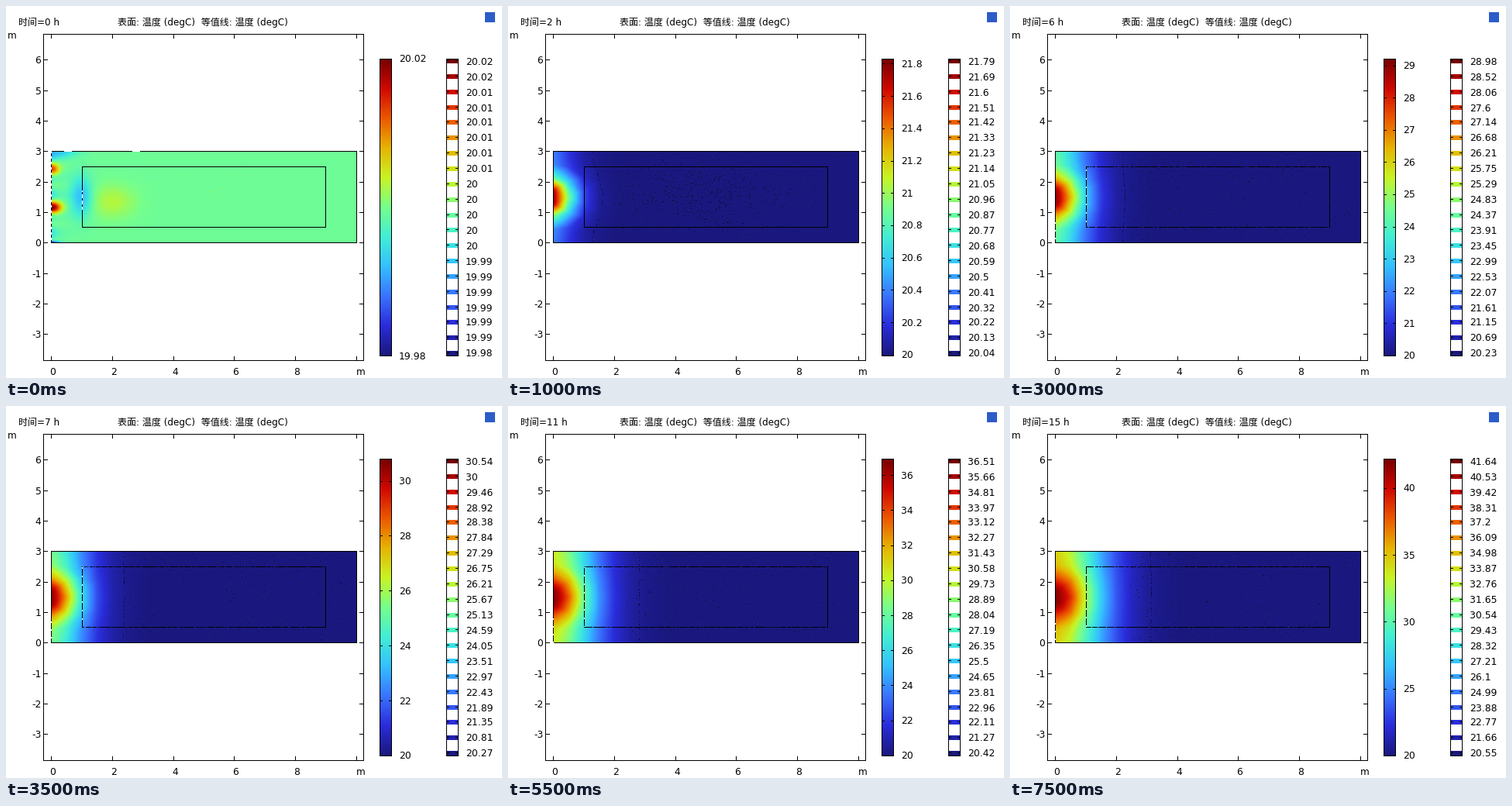
A matplotlib script that plays this animation: 640 px wide and 480 px high, repeating every 8 s.

```python
import numpy as np
import matplotlib.pyplot as plt
from matplotlib.animation import FuncAnimation
from matplotlib.colors import LinearSegmentedColormap
from matplotlib.patches import Rectangle
from matplotlib.tri import LinearTriInterpolator, Triangulation

W, H, DPI = 640, 480, 100
HOURS = 16
LEVELS = 20
X0, Y0, SCALE = 58, 305.4, 39.35       # pixel of (0 m, 0 m), pixels per metre
BAR_TOP, BAR_BOTTOM = 68, 451
BAR_SPAN = BAR_BOTTOM - BAR_TOP

plt.rcParams["font.family"] = ["DejaVu Sans", "Noto Sans CJK JP"]
rainbow = LinearSegmentedColormap.from_list("rainbow", [
    "#1a187e", "#2a2cda", "#3a74ff", "#34c0ff", "#42eed4", "#76ff8c",
    "#c8f424", "#e6b400", "#ed5800", "#d00800", "#780000"], N=512)

fig = plt.figure(figsize=(W / DPI, H / DPI), dpi=DPI, facecolor="white")
ax = fig.add_axes([0, 0, 1, 1])
ax.set_xlim(0, W)
ax.set_ylim(H, 0)
ax.autoscale(False)
ax.axis("off")


def label(x, y, s, size=12.4, ha="left"):
    return ax.text(x, y + 4.5, s, fontsize=size * 72 / DPI, ha=ha, va="baseline")


def box(x, y, w, h, color="black"):
    return ax.add_patch(Rectangle((x, y), w, h, fc=color, lw=0, antialiased=False))


def outline(x0, y0, x1, y1):
    for y in (y0, y1):
        box(x0, y, x1 - x0 + 1, 1)
    for x in (x0, x1):
        box(x, y0, 1, y1 - y0 + 1)


def image(data, x, y, w, h):
    return ax.imshow(data, extent=(x, x + w, y + h, y), aspect="auto",
                     interpolation="nearest")


def level_y(i):
    return round(448.1 - 377 * i / (LEVELS - 1))


def draw_axes():
    outline(48, 36, 461, 457)
    for m in range(0, 11, 2):
        x = round(X0 + 39.4 * m)
        box(x, 36, 1, 6)
        box(x, 452, 1, 6)
        if m < 10:
            label(x + 2, 471, str(m), ha="center")
    for m in range(-3, 7):
        y = round(Y0 - SCALE * m)
        box(48, y, 6, 1)
        box(456, y, 6, 1)
        label(45.5, y + 0.5, str(m), ha="right")
    label(458, 471, "m", 12, "center")
    label(2, 37, "m", 12)


def draw_legends():
    image(rainbow(np.linspace(1, 0, BAR_SPAN)[:, None]), 482, BAR_TOP, 16, BAR_SPAN)
    outline(482, BAR_TOP, 497, BAR_BOTTOM)
    for i in range(LEVELS):
        y = level_y(i)
        box(569, y - 3, 14, 6, rainbow(i / (LEVELS - 1)))
        for x in (569, 580):
            box(x, y - 1, 3, 1)
    outline(568, BAR_TOP, 583, BAR_BOTTOM)


# One sample per pixel of the room, 10 m by 3 m.
COLS, ROWS = 395, 119
gx, gy = np.meshgrid(np.linspace(.001, 9.999, COLS), np.linspace(2.999, .001, ROWS))

# Coarse staggered mesh that gives the fronts their facets.
nodes = [(k / 2, y) for k in range(21) for y in np.linspace(0, 3, 8 - k % 2)]
mesh = Triangulation(*np.array(nodes).T)


def temperature_range(hour):
    high = np.interp(hour, [0, 1, 2, 4, 6, 9, 11, 15],
                     [20.01855, 20.42, 21.831, 25.56, 29.208, 34.009, 36.93, 42.195])
    return 20 - .01745 / (1 + hour), high


def blob(x, y, cx, cy, rx, ry):
    return np.exp(-((x - cx) / rx) ** 2 - ((y - cy) / ry) ** 2)


def initial(x, y):
    warm = (.55 * blob(x, y, 0, 1.15, .32, .2) + .38 * blob(x, y, 0, 2.4, .25, .2)
            + .09 * blob(x, y, 2, 1.35, .75, .55))
    cool = (.19 * blob(x, y, .98, 1.5, .36, .65) + .16 * blob(x, y, .2, 3, .6, .2)
            + .42 * blob(x, y, 0, 0, .28, .06))
    wall = .12 * np.exp(-x / .25) * np.sin(5 * y) ** 2
    return .485 + warm - cool - wall


def heated(x, y, hour):
    s = np.sqrt(hour)
    base = .7 * (1 - np.exp(-hour / 5.5))
    wall = np.exp(-(x / (.17 + .37 * s)) ** (1.1 + .18 * s))
    reach = np.exp(-(x / (.37 + .19 * s)) ** (1.3 + .155 * s))
    spread = np.exp(-(np.abs(y - 1.49) / (.55 + .05 * s + .05 * x)) ** 2.4)
    return base * wall + (1 - base) * reach * spread


def field(hour):
    if hour == 0:
        return initial(gx, gy)
    facets = LinearTriInterpolator(mesh, heated(mesh.x, mesh.y, hour))(gx, gy)
    return (heated(gx, gy, hour) + 2 * facets.filled(0)) / 3


def speckle(hour, rng):
    """Rows and columns of the stray contour dots."""
    if hour <= 2:
        n = 650 if hour else 70
        c, r = rng.normal(200, 65, n), rng.normal(58, 24, n)
    else:
        n = 170
        c, r = rng.uniform(95, 390, n), rng.uniform(2, 116, n)
    ok = (c > 75) & (c < 392) & (r > 1) & (r < 117)
    return r[ok].astype(int), c[ok].astype(int)


def room(hour):
    rng = np.random.default_rng(40 + hour)
    u = np.clip(field(hour), 0, 1)
    r, c = speckle(hour, rng)
    if hour == 0:
        u[r, c] += rng.choice([-.07, .09], len(r))
    img = rainbow(u)[..., :3]
    if hour:
        img[r, c] = (.04, .05, .2)
        for row in np.flatnonzero(rng.random(ROWS) < .35):   # outermost contour
            img[row, np.argmax(u[row] < .025)] = (.04, .04, .25)

    # outer walls and inner rectangle
    img[[0, -1], :] = 0
    img[:, [0, -1]] = 0
    for row in (20, 98):
        keep = rng.random(COLS) < (1 if hour <= 2 else .87)
        keep[:40] = keep[355:] = False
        img[row, keep] = 0
    img[20:99, [40, 354]] = 0

    # contours cut white gaps into the left walls
    rows = np.arange(ROWS)
    if hour == 0:
        img[rows % 7 < 3, 0] = 1
        img[(abs(rows - 63) < 13) & (rows % 8 < 5), 40] = 1
        for start in (17, 105):
            img[0, start:start + 10] = 1
    elif hour > 3:
        img[(abs(rows - 59) < 39) & ((rows + 3 * hour) % 11 > 8), 40] = 1
        img[(rows > 85) & ((rows + hour) % 10 > 7), 0] = 1
    return img


def nice_step(span):
    steps = [k * 10.0 ** e for e in range(-2, 2) for k in (1, 2, 5)]
    return next(s for s in steps if span / s <= 10)


draw_axes()
draw_legends()
label(144, 21, "表面: 温度 (degC)  等值线: 温度 (degC)", 12)
box(618, 8, 13, 13, "#2c5cc8")
clock = label(16, 21, "", 12)
view = image(np.ones((ROWS, COLS, 3)), 58, 187, COLS, ROWS)
names = [label(593, level_y(i), "") for i in range(LEVELS)]
marks = []


def mark(y, value, tick=True):
    if tick:
        marks.extend(box(x, round(y), 3, 1) for x in (483, 494))
    marks.append(label(507, y, f"{value:.4g}"))


def update(hour):
    while marks:
        marks.pop().remove()
    low, high = temperature_range(hour)
    span = high - low
    clock.set_text(f"时间={hour} h")
    view.set_data(room(hour))
    for i, name in enumerate(names):
        name.set_text(f"{low + span * (i + .5) / LEVELS:.4g}")
    if hour == 0:
        mark(BAR_TOP, high, False)
        mark(BAR_BOTTOM, low, False)
    else:
        step = nice_step(span)
        for value in np.arange(20, high, step):
            mark(BAR_BOTTOM - BAR_SPAN * (value - low) / span, value)
    return [clock, view, *names, *marks]


anim = FuncAnimation(fig, update, frames=HOURS, interval=500, repeat=True,
                     repeat_delay=0, blit=False)
plt.show()
```
